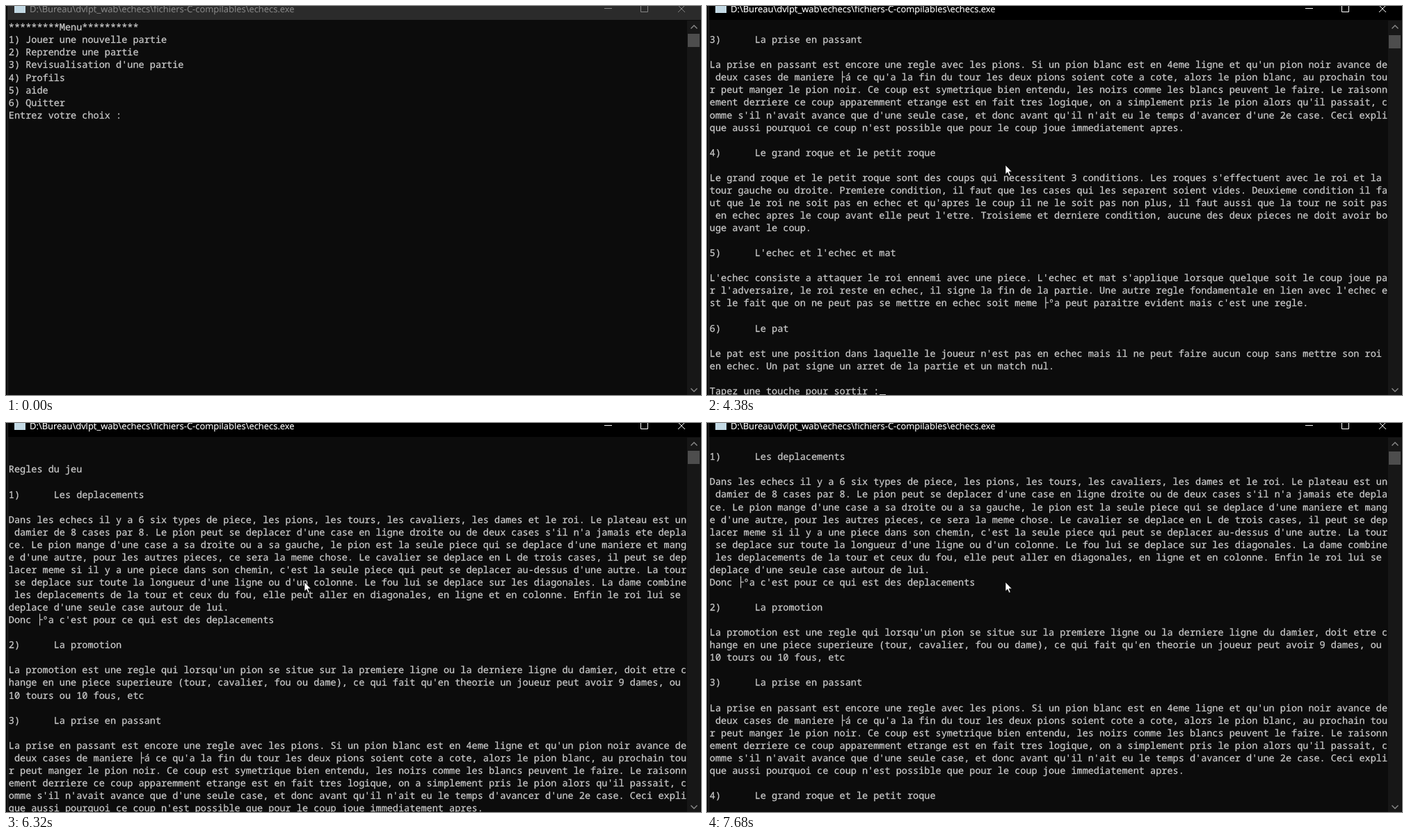
An HTML page that plays this animation: 999 px wide and 560 px high, repeating every 8 s.

```html
<!DOCTYPE html>
<html lang="fr">
<head>
<meta charset="utf-8">
<title>Menu</title>
<style>
  html, body { margin: 0; width: 100%; height: 100%; overflow: hidden; background: #0c0c0c; }

  #stage {
    --row: 0;
    --pitch: 18.07px;
    --cell: 8.125px;
    position: relative;
    width: 999px;
    height: 560px;
    overflow: hidden;
    background: #0c0c0c;
    text-rendering: geometricPrecision;
  }
  #stage, #stage * { animation: 8s step-end infinite; }
  #stage { animation-name: scroll; }
  #stage > *, #caret { position: absolute; }

  #console { left: 0; top: 21px; width: 979px; height: 539px; overflow: hidden; }
  pre {
    position: absolute;
    left: 3.8px;
    top: calc(.3px - var(--row) * var(--pitch));
    margin: 0;
    color: #ccc;
    font: 13.54px/var(--pitch) "Noto Sans Mono", monospace;
    font-variant-ligatures: none;
    -webkit-text-stroke: .25px;
    tab-size: 8;
  }
  #stage #key { animation-name: key; }
  #stage #rules { animation-name: rules; }
  #stage #caret {
    --line: 7;
    --col: 21;
    left: calc(var(--col) * var(--cell));
    top: calc((var(--line) + 1) * var(--pitch) - 4.3px);
    width: var(--cell);
    height: 2px;
    background: #ccc;
    animation-name: caret;
  }

  #bar { left: 0; top: 0; width: 999px; height: 20px; background: #000; color: #fff; }
  #stage #bar { animation-name: focus; }
  #path {
    position: absolute;
    left: 34px;
    top: -5px;
    font: 12.96px/18px "Open Sans", sans-serif;
    -webkit-text-stroke: .15px;
    white-space: pre;
  }
  #icon { position: absolute; left: 12px; top: -5px; width: 16px; height: 15px; background: #c3d9e4; }
  #bar svg { position: absolute; left: 850px; top: 0; }
  #edge { left: 0; top: 0; width: 2px; height: 560px; background: #080808; border-right: 1px solid #2b2b2b; }

  #track { left: 979px; top: 21px; width: 19px; height: 539px; background: #171717; }
  #thumb { left: 980px; top: calc(40px + var(--row) * .056px); width: 17px; height: 19px; background: #4d4d4d; }
  #arrows { left: 979px; top: 0; }
  #mouse { left: 0; top: 0; }
  #stage #mouse { animation-name: mouse; }

  @keyframes scroll {
    0% { --row: 0; }
    53.875% { --row: 29; }
    71.25% { --row: 20; }
    72.125% { --row: 17; }
    73% { --row: 14; }
    78.125% { --row: 11; }
    79% { --row: 8; }
    82.875% { --row: 5; }
    83.375% { --row: 2; }
    91.875% { --row: 5; }
    93.5% { --row: 8; }
    96%, 100% { --row: 11; }
  }
  @keyframes caret {
    0%, 6.875%, 20.5%, 33.75%, 47.25% { opacity: 0; --line: 7; --col: 21; }
    2.875%, 13.875%, 27.125%, 40.625% { opacity: 1; --line: 7; --col: 21; }
    51.375% { opacity: 1; --line: 7; --col: 22; }
    53.875% { opacity: 0; --line: 7; --col: 22; }
    54.75% { opacity: 1; --line: 58; --col: 30; }
    67.125%, 100% { opacity: 0; --line: 58; --col: 30; }
  }
  @keyframes key { 0% { opacity: 0; } 51.375%, 100% { opacity: 1; } }
  @keyframes rules { 0% { opacity: 0; } 53.875%, 100% { opacity: 1; } }
  @keyframes focus {
    0% { background: #2b2b2b; color: #858585; }
    2.875%, 100% { background: #000; color: #fff; }
  }
  @keyframes mouse {
    0% { opacity: 0; transform: translate(445px, 552px); }
    3.875% { opacity: 1; transform: translate(445px, 552px); animation-timing-function: steps(5, end); }
    8.875%, 100% { opacity: 1; transform: translate(429px, 229px); }
  }
</style>
</head>
<body>
<div id="stage">
  <div id="console"><pre>*********Menu**********
1) Jouer une nouvelle partie
2) Reprendre une partie
3) Revisualisation d'une partie
4) Profils
5) aide
6) Quitter
Entrez votre choix : <span id="key">5</span>
<span id="rules">

Regles du jeu

1)	Les deplacements

Dans les echecs il y a 6 six types de piece, les pions, les tours, les cavaliers, les dames et le roi. Le plateau est un
 damier de 8 cases par 8. Le pion peut se deplacer d'une case en ligne droite ou de deux cases s'il n'a jamais ete depla
ce. Le pion mange d'une case a sa droite ou a sa gauche, le pion est la seule piece qui se deplace d'une maniere et mang
e d'une autre, pour les autres pieces, ce sera la meme chose. Le cavalier se deplace en L de trois cases, il peut se dep
lacer meme si il y a une piece dans son chemin, c'est la seule piece qui peut se deplacer au-dessus d'une autre. La tour
 se deplace sur toute la longueur d'une ligne ou d'un colonne. Le fou lui se deplace sur les diagonales. La dame combine
 les deplacements de la tour et ceux du fou, elle peut aller en diagonales, en ligne et en colonne. Enfin le roi lui se
deplace d'une seule case autour de lui.
Donc ├ºa c'est pour ce qui est des deplacements

2)	La promotion

La promotion est une regle qui lorsqu'un pion se situe sur la premiere ligne ou la derniere ligne du damier, doit etre c
hange en une piece superieure (tour, cavalier, fou ou dame), ce qui fait qu'en theorie un joueur peut avoir 9 dames, ou
10 tours ou 10 fous, etc

3)	La prise en passant

La prise en passant est encore une regle avec les pions. Si un pion blanc est en 4eme ligne et qu'un pion noir avance de
 deux cases de maniere ├á ce qu'a la fin du tour les deux pions soient cote a cote, alors le pion blanc, au prochain tou
r peut manger le pion noir. Ce coup est symetrique bien entendu, les noirs comme les blancs peuvent le faire. Le raisonn
ement derriere ce coup apparemment etrange est en fait tres logique, on a simplement pris le pion alors qu'il passait, c
omme s'il n'avait avance que d'une seule case, et donc avant qu'il n'ait eu le temps d'avancer d'une 2e case. Ceci expli
que aussi pourquoi ce coup n'est possible que pour le coup joue immediatement apres.

4)	Le grand roque et le petit roque

Le grand roque et le petit roque sont des coups qui necessitent 3 conditions. Les roques s'effectuent avec le roi et la
tour gauche ou droite. Premiere condition, il faut que les cases qui les separent soient vides. Deuxieme condition il fa
ut que le roi ne soit pas en echec et qu'apres le coup il ne le soit pas non plus, il faut aussi que la tour ne soit pas
 en echec apres le coup avant elle peut l'etre. Troisieme et derniere condition, aucune des deux pieces ne doit avoir bo
uge avant le coup.

5)	L'echec et l'echec et mat

L'echec consiste a attaquer le roi ennemi avec une piece. L'echec et mat s'applique lorsque quelque soit le coup joue pa
r l'adversaire, le roi reste en echec, il signe la fin de la partie. Une autre regle fondamentale en lien avec l'echec e
st le fait que on ne peut pas se mettre en echec soit meme ├ºa peut paraitre evident mais c'est une regle.

6)	Le pat

Le pat est une position dans laquelle le joueur n'est pas en echec mais il ne peut faire aucun coup sans mettre son roi
en echec. Un pat signe un arret de la partie et un match nul.

Tapez une touche pour sortir :</span><i id="caret"></i></pre></div>

  <div id="bar">
    <i id="icon"></i>
    <span id="path">D:\Bureau\dvlpt_wab\echecs\fichiers-C-compilables\echecs.exe</span>
    <svg width="149" height="20" fill="none" stroke="currentColor">
      <path d="M10 3.5h11M62.5-2v10.5h10V-2M116-1l10 10M126-1l-10 10"/>
    </svg>
  </div>
  <div id="edge"></div>

  <div id="track"></div>
  <div id="thumb"></div>
  <svg id="arrows" width="20" height="560" fill="none" stroke="#8c8c8c" stroke-width="1.4">
    <path d="M5.5 32.5l4.5-4.5 4.5 4.5M5.5 550.5l4.5 4.5 4.5-4.5"/>
  </svg>

  <svg id="mouse" width="14" height="20" overflow="visible">
    <path d="M0 0V13.3L3 10.5 5.2 15.4 7.3 14.5 5.2 9.7H9.4Z" fill="#fff" stroke="#000" stroke-width=".7"/>
  </svg>
</div>
</body>
</html>
```
